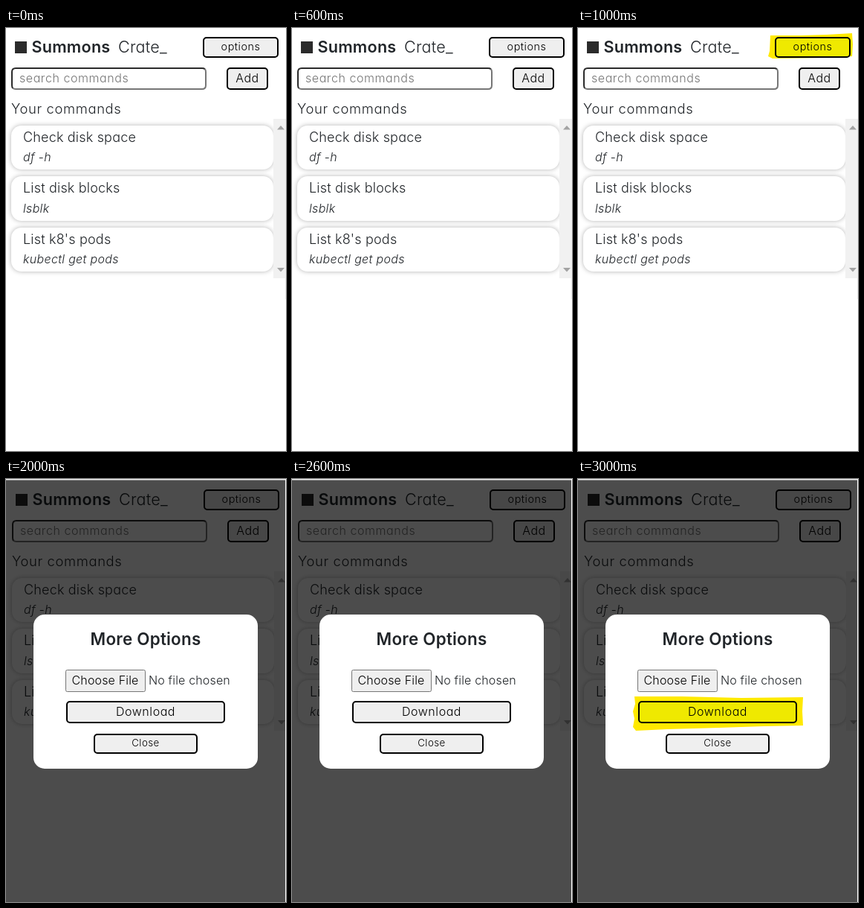
Recreate the animation shown at these times as an HTML page. Size 377 by 568 pixels, loop 4000 ms.

```html
<!DOCTYPE html>
<html lang="en">
<head>
<meta charset="utf-8">
<title>Summons Crate</title>
<style>
  html, body { margin: 0; width: 100%; height: 100%; overflow: hidden; background: #fff; }
  svg { display: block; }
  text {
    font-family: Inter, "Open Sans", sans-serif;
    font-feature-settings: "cv11";
    font-optical-sizing: none;
    font-size: 16px;
    font-weight: 350;
    letter-spacing: .01em;
    fill: #212529;
  }
  .mid { text-anchor: middle; }
  .wide { letter-spacing: .035em; }
  .brand { font-size: 21.6px; }
  .bold { font-weight: 600; }
  .hint { fill: #757575; }
  .name { font-size: 18px; }
  .code { font-size: 16px; font-style: italic; letter-spacing: .02em; }
  .black { fill: #000; }
  .btn { fill: #efefef; stroke: #000; stroke-width: 2; }
  .card { fill: #fff; filter: drop-shadow(0 0 3px rgba(0, 0, 0, .3)); }
  .edge { fill: none; stroke-width: 2; }
  .marker { fill: #ffe900; mix-blend-mode: darken; }

  .page, .mark-options, .dialog, .mark-download { animation: 4s step-end infinite; }
  .page { animation-name: nudge; }
  .mark-options { opacity: 0; animation-name: second; }
  .dialog { opacity: 0; animation-name: half; }
  .mark-download { opacity: 0; animation-name: last; }
  @keyframes nudge { 0% { transform: none; } 50%, 100% { transform: translate(1px, 2px); } }
  @keyframes second { 0% { opacity: 0; } 25% { opacity: 1; } 50%, 100% { opacity: 0; } }
  @keyframes half { 0% { opacity: 0; } 50%, 100% { opacity: 1; } }
  @keyframes last { 0% { opacity: 0; } 75%, 100% { opacity: 1; } }
</style>
</head>
<body>
<svg width="377" height="568">
  <rect width="377" height="568" fill="#fff"/>
  <g class="page">
    <rect x="12" y="18" width="16" height="16" fill="#2b2b2b"/>
    <text class="brand bold" x="34.5" y="33">Summons</text>
    <text class="brand" x="151" y="33">Crate_</text>

    <rect class="btn" x="266" y="13" width="100" height="26" rx="4"/>
    <text class="mid wide black" x="316" y="30" style="font-size:14.4px">options</text>

    <path class="edge" stroke="#767676" d="M9.2 80.8Q10.4 82 13 82H264Q269 82 269 77V59Q269 56.4 267.8 55.2"/>
    <path class="edge" stroke="#2b2b2b" d="M9.2 80.8Q8 79.6 8 77V59Q8 54 13 54H264Q266.6 54 267.8 55.2"/>
    <text class="hint wide" x="18" y="73">search commands</text>

    <rect class="btn" x="298" y="54" width="54" height="28" rx="4"/>
    <text class="mid wide black" x="325" y="73">Add</text>

    <text class="wide" x="7" y="115" style="font-size:18.4px">Your commands</text>

    <rect class="card" x="7" y="131" width="353" height="59" rx="14"/>
    <rect class="card" x="7" y="199" width="353" height="60" rx="14"/>
    <rect class="card" x="7" y="268" width="353" height="59" rx="14"/>
    <text class="name" x="23" y="153">Check disk space</text>
    <text class="code" x="23" y="179">df -h</text>
    <text class="name" x="23" y="221">List disk blocks</text>
    <text class="code" x="23" y="248">lsblk</text>
    <text class="name" x="23" y="290">List k8's pods</text>
    <text class="code" x="23" y="316">kubectl get pods</text>

    <rect x="360" y="122" width="17" height="214" fill="#f1f1f1"/>
    <path d="M365 136.500L370 131L375 136.500ZM365 322L370 327.500L375 322Z" fill="#a3a3a3"/>
    <rect x="376" y="336" width="1" height="28" fill="#eee"/>
  </g>

  <path class="marker mark-options" d="M259 10L300 10L335 9L369 7L370 22L369 38L330 40L262 41L256 38L258 31Z"/>

  <g class="dialog">
    <rect width="377" height="2" fill="#f1f1f1"/>
    <rect x="376" width="1" height="568" fill="#fff"/>
    <rect y="1.500" width="376" height="566.500" fill="#000" fill-opacity=".7"/>
    <rect x="37" y="182" width="302" height="207" rx="15" fill="#fff"/>
    <text class="mid bold" x="188" y="223" style="font-size:22.4px">More Options</text>

    <rect x="80.500" y="256.500" width="107" height="29" rx="2" fill="#efefef" stroke="#767676"/>
    <text class="mid black" x="133.500" y="276">Choose File</text>
    <text x="192" y="276">No file chosen</text>

    <rect class="btn" x="82" y="299" width="212" height="28" rx="4"/>
    <text class="mid wide black" x="188" y="318">Download</text>

    <rect class="btn" x="119" y="343" width="138" height="25" rx="4"/>
    <text class="mid wide black" x="188" y="359" style="font-size:13.3px">Close</text>
  </g>

  <path class="marker mark-download" d="M76 292L140 292L220 294L303 293L302 312L303 331L250 332L190 334L120 336L78 338L74 333L76 322L74 312L77 302Z"/>
</svg>
</body>
</html>
```
